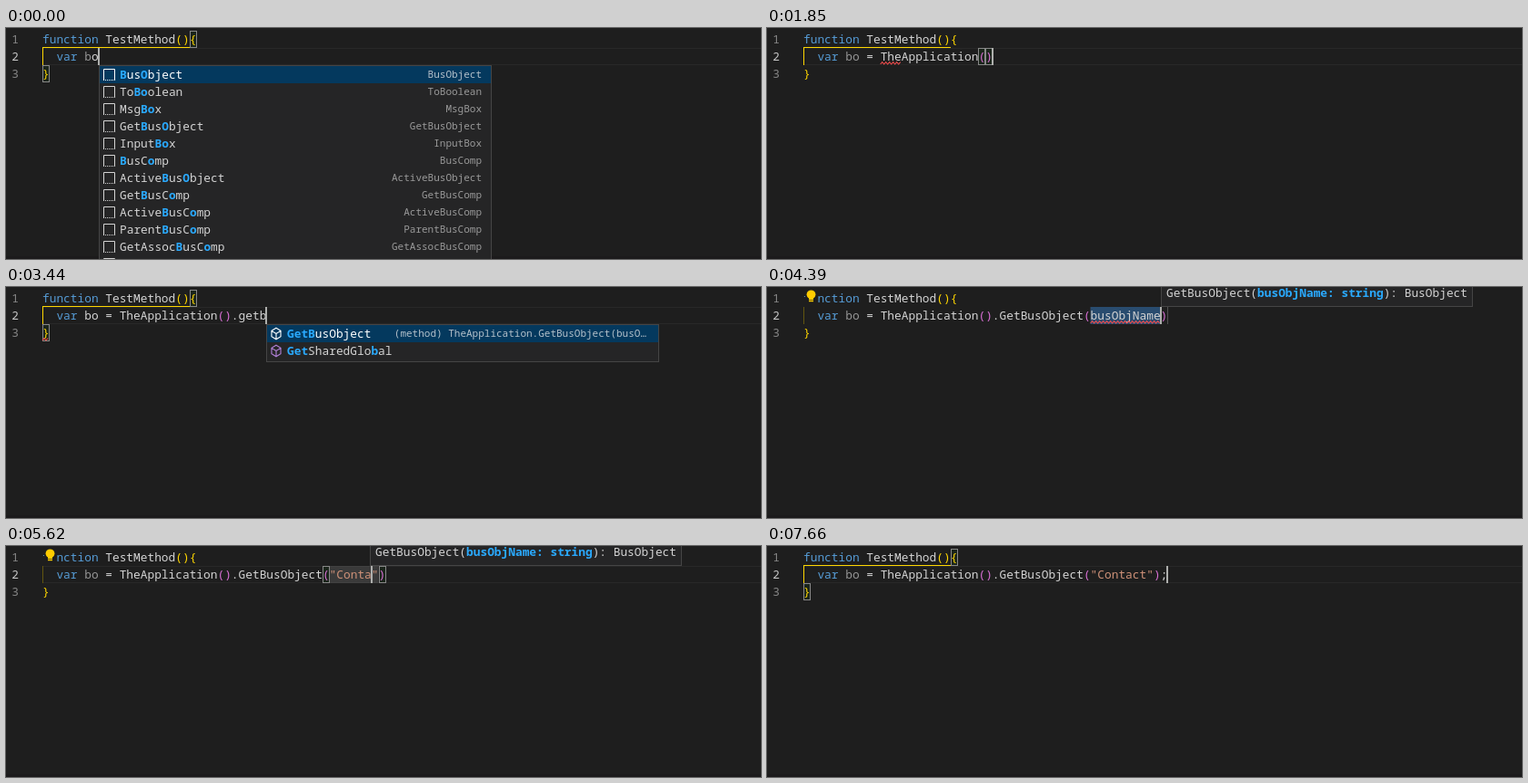
Write an HTML page with a canvas that moves like this. It is 830 px wide and 255 px high and loops after 8000 ms.

```html
<!DOCTYPE html>
<html lang="en">
<head>
<meta charset="utf-8">
<title>Code completion</title>
<style>
html, body { margin: 0; width: 100%; height: 100%; overflow: hidden; background: #1e1e1e; }
canvas { display: block; width: 830px; height: 255px; }
</style>
</head>
<body>
<canvas id="stage" width="830" height="255"></canvas>
<script>
const ctx = document.getElementById('stage').getContext('2d');
const LOOP = 8000, LEFT = 40, CHAR = 7.698, ROW = 19, TOP = 3;
const MONO = '"Noto Sans Mono", monospace';
const CODE = `12.83px ${MONO}`, BOLD = `bold ${CODE}`, SMALL = `11px ${MONO}`;
const C = {
  bg: '#1e1e1e', text: '#d4d4d4', keyword: '#569cd6', string: '#ce9178',
  gold: '#ffd700', pink: '#da70d6', dim: '#959595', match: '#2aaaff',
  panel: '#252526', edge: '#454545', error: '#f14c4c'
};

const boxWords = ['BusObject', 'ToBoolean', 'MsgBox', 'GetBusObject', 'InputBox', 'BusComp',
  'ActiveBusObject', 'GetBusComp', 'ActiveBusComp', 'ParentBusComp', 'GetAssocBusComp', 'GetMVGBusComp'];
const theWords = ['TheApplication', 'GetSearchExpr', 'GetSearchSpec', 'SetSearchExpr'];
const thWords = [...theWords, 'this', 'throw', 'with', 'switch', 'InvokeMethod', 'TestMethod'];
const getters = ['GetBusObject', 'GetDataSource', 'GetProfileAttr', 'GetService', 'GetSharedGlobal'];
const members = ['ActiveBusObject', 'ActiveViewName', 'CurrencyCode', ...getters,
  'GotoView', 'InvokeMethod', 'LoginId', 'LoginName'];
const gWords = [...getters, 'GotoView', 'LoginName', 'RaiseError', 'SetSharedGlobal', 'ActiveViewName',
  'CurrencyCode', 'Language'];

const menu = (words, query, methods = false) => ({ words, query, methods });
const APP = '  var bo = TheApplication()';
const CALL = APP + '.GetBusObject(';

// Each step overrides only what changes.
const steps = [
  [0, { line: '  var bo', caret: 8, dim: 1, menu: menu(boxWords, 'bo'), pair: 'braces', guide: true,
        hint: 0, bulb: false, wave: null, broken: false, select: null, slot: 0, lit: true }],
  [400, { line: '  var bo ', caret: 9, dim: 2, menu: null }],
  [830, { line: '  var bo =', caret: 10 }],
  [980, { line: '  var bo = ', caret: 11 }],
  [1110, { line: '  var bo = t', caret: 12 }],
  [1260, { line: '  var bo = th', caret: 13, menu: menu(thWords, 'th') }],
  [1400, { line: '  var bo = the', caret: 14, menu: menu(theWords, 'the') }],
  [1850, { line: APP, caret: 27, menu: null, pair: [25, 26], wave: [11, 14] }],
  [2240, { wave: null, lit: false }],
  [2490, { line: APP + '.', caret: 28, pair: 'braces', lit: true }],
  [2610, { menu: menu(members, '', true) }],
  [2900, { line: APP + '.g', caret: 29, menu: menu(gWords, 'g', true) }],
  [3030, { dim: 0, broken: true }],
  [3160, { line: APP + '.ge', caret: 30, menu: menu(getters, 'ge', true) }],
  [3290, { line: APP + '.get', caret: 31, menu: menu(getters, 'get', true) }],
  [3440, { line: APP + '.getb', caret: 32, menu: menu(['GetBusObject', 'GetSharedGlobal'], 'getb', true) }],
  [3870, { line: CALL + 'busObjName)', caret: 51, menu: null, pair: null, guide: false,
           select: [41, 51], slot: 51 }],
  [4000, { hint: 433 }],
  [4130, { bulb: true }],
  [4250, { dim: 2, broken: false }],
  [4390, { wave: [41, 51] }],
  [4510, { line: CALL + '"busObjName")', caret: 52, select: [42, 52], slot: 53, wave: null, hint: 440 }],
  [4910, { line: CALL + '"C")', caret: 43, select: null, slot: 44, pair: [40, 44], hint: 371 }],
  [5200, { line: CALL + '"Co")', caret: 44, slot: 45, pair: [40, 45], hint: 379 }],
  [5320, { line: CALL + '"Con")', caret: 45, slot: 46, pair: [40, 46] }],
  [5470, { line: CALL + '"Cont")', caret: 46, slot: 47, pair: [40, 47], hint: 388 }],
  [5620, { line: CALL + '"Conta")', caret: 47, slot: 48, pair: [40, 48], hint: 400 }],
  [5770, { line: CALL + '"Contac")', caret: 48, slot: 49, pair: [40, 49] }],
  [5890, { hint: 410 }],
  [6180, { line: CALL + '"Contact")', caret: 49, slot: 50, pair: [40, 50], hint: 417 }],
  [6310, { bulb: false }],
  [6600, { caret: 50, hint: 425 }],
  [6870, { caret: 51, hint: 433, slot: 0, guide: true }],
  [6990, { hint: 0 }],
  [7400, { line: CALL + '"Contact");' }],
  [7520, { caret: 52 }],
  [7660, { pair: 'braces' }]
];

const colX = col => LEFT + col * CHAR;
const rowY = row => TOP + row * ROW;

function fill(x, y, w, h, color) {
  ctx.fillStyle = color;
  ctx.fillRect(x, y, w, h);
}

function frame(x, y, w, h, color) {
  ctx.strokeStyle = color;
  ctx.lineWidth = 1;
  ctx.strokeRect(x + 0.5, y + 0.5, w - 1, h - 1);
}

function write(str, x, y, color, font = CODE) {
  ctx.font = font;
  ctx.fillStyle = color;
  ctx.fillText(str, x, y);
}

function code(str, row, paren, dim = 0) {
  const y = rowY(row) + 14;
  for (const { 0: word, index } of str.matchAll(/"[^"]*"|[(){}]|\w+|[^\s\w]/g)) {
    let color = C.text;
    if (word[0] === '"') color = C.string;
    else if (/^(function|var)$/.test(word)) color = C.keyword;
    else if (/[(){}]/.test(word)) color = paren;
    if (word === 'bo') {
      write('b', colX(index), y, dim > 0 ? C.dim : color);
      write('o', colX(index + 1), y, dim > 1 ? C.dim : color);
    } else write(word, colX(index), y, color);
  }
}

function bracketBox(col, row) {
  const x = Math.round(colX(col));
  fill(x, rowY(row), 8, ROW, 'rgba(0,100,0,.1)');
  frame(x, rowY(row), 8, ROW, '#888888');
}

function squiggle(from, to, row) {
  const base = rowY(row) + 17, end = colX(to);
  ctx.beginPath();
  for (let x = colX(from), up = 0; x <= end; x += 2, up ^= 1) ctx.lineTo(x, base + (up ? -1.3 : 1));
  ctx.strokeStyle = C.error;
  ctx.lineWidth = 1.1;
  ctx.stroke();
}

function snippetIcon(x, y, color) {
  ctx.strokeStyle = color;
  ctx.lineWidth = 1;
  ctx.beginPath();
  ctx.moveTo(x + 0.5, y + 12);
  ctx.lineTo(x + 0.5, y + 0.5);
  ctx.lineTo(x + 12.5, y + 0.5);
  ctx.lineTo(x + 12.5, y + 12);
  ctx.stroke();
  for (let i = 0; i < 13; i += 2) fill(x + i, y + 12, 1, 1, color);
}

function cubeIcon(cx, cy, color) {
  const pt = i => [cx + 5.8 * Math.sin(i * Math.PI / 3), cy - 6.3 * Math.cos(i * Math.PI / 3)];
  ctx.beginPath();
  for (let i = 0; i < 6; i++) ctx.lineTo(...pt(i));
  ctx.closePath();
  for (const i of [1, 3, 5]) {
    ctx.moveTo(cx, cy);
    ctx.lineTo(...pt(i));
  }
  ctx.strokeStyle = color;
  ctx.lineWidth = 1.1;
  ctx.stroke();
}

function label(word, query, x, y, color) {
  let hit = 0, run = '', runX = x, wasHit = false;
  const flush = () => run && write(run, runX, y, wasHit ? C.match : color, wasHit ? BOLD : CODE);
  [...word].forEach((ch, i) => {
    const isHit = hit < query.length && ch.toLowerCase() === query[hit];
    if (isHit) hit++;
    if (isHit !== wasHit) {
      flush();
      run = '';
      runX = x + i * CHAR;
      wasHit = isHit;
    }
    run += ch;
  });
  flush();
}

function drawMenu({ words, query, methods }, x) {
  const top = 41, w = 432, h = words.length * ROW + 4;
  fill(x, top, w, h, C.panel);
  frame(x, top, w, h, C.edge);
  words.forEach((word, i) => {
    const y = top + 1 + i * ROW, picked = i === 0;
    if (picked) fill(x + 1, y, w - 2, ROW, '#04395e');
    const tone = picked ? '#ffffff' : C.text;
    if (methods) cubeIcon(x + 11, y + 9.5, picked ? tone : '#b180d7');
    else snippetIcon(x + 5, y + 3, tone);
    label(word, query, x + 23, y + 14, tone);
    if (methods && !picked) return;
    const detail = methods
      ? `(method) TheApplication.${word}(busObjName: string)`.slice(0, 41) + '…'
      : word;
    ctx.textAlign = 'right';
    write(detail, x + (methods ? 418 : 421), y + 13, picked ? '#b4c0ca' : '#9a9a9a', SMALL);
    ctx.textAlign = 'left';
  });
}

function drawHint(x) {
  fill(x, -2, 343, 24, C.panel);
  frame(x, -2, 343, 24, C.edge);
  let tx = x + 6;
  for (const [str, hot] of [['GetBusObject(', 0], ['busObjName: string', 1], ['): BusObject', 0]]) {
    write(str, tx, 11, hot ? C.match : C.text, hot ? BOLD : CODE);
    tx += str.length * CHAR;
  }
}

function drawBulb() {
  fill(42, 1, 13, 18, C.bg);
  ctx.fillStyle = '#ffcc00';
  ctx.beginPath();
  ctx.arc(48.5, 8.3, 4.9, 0, 2 * Math.PI);
  ctx.fill();
  fill(46, 11, 5, 3, '#ffcc00');
  fill(46, 14.6, 5, 1.6, '#ffcc00');
}

function draw(s) {
  fill(0, 0, 830, 255, C.bg);
  fill(0, 252, 830, 3, '#1b1a1b');

  if (!s.select) {
    fill(LEFT, 22, 790, 1, '#282828');
    fill(LEFT, 40, 790, 1, '#282828');
  }
  if (s.slot) {
    const x = colX(41);
    fill(x, 22, colX(s.slot) - x, ROW, 'rgba(124,124,124,.3)');
    fill(Math.round(colX(s.slot + 1)), 22, 1, ROW, '#525252');
  }
  if (s.select) {
    const [a, b] = s.select.map(colX);
    fill(a, 22, b - a, ROW, 'rgba(38,79,120,.85)');
  }

  fill(LEFT, 22, 1, ROW, s.guide ? C.gold : '#62560f');
  if (s.guide) fill(LEFT, 21, 162, 1, C.gold);

  if (s.pair === 'braces') {
    bracketBox(21, 0);
    bracketBox(0, 2);
  } else if (s.pair) s.pair.forEach(col => bracketBox(col, 1));

  for (let i = 0; i < 3; i++) write(i + 1, 6.3, rowY(i) + 14, i === 1 ? '#c6c6c6' : '#858585');
  code('function TestMethod(){', 0, C.gold);
  code(s.line, 1, C.pink, s.dim);
  code('}', 2, C.gold);

  if (s.wave) squiggle(...s.wave, 1);
  if (s.broken) squiggle(0, 1, 2);
  const caretX = Math.round(colX(s.caret));
  if (s.lit) fill(caretX - 1, 22, 2, ROW, '#aeafad');
  if (s.bulb) drawBulb();
  if (s.menu) drawMenu(s.menu, caretX);
  if (s.hint) drawHint(s.hint);
}

function tick(now) {
  const t = now % LOOP;
  draw(Object.assign({}, ...steps.filter(([at]) => at <= t).map(([, change]) => change)));
  requestAnimationFrame(tick);
}
tick(0);
</script>
</body>
</html>
```
